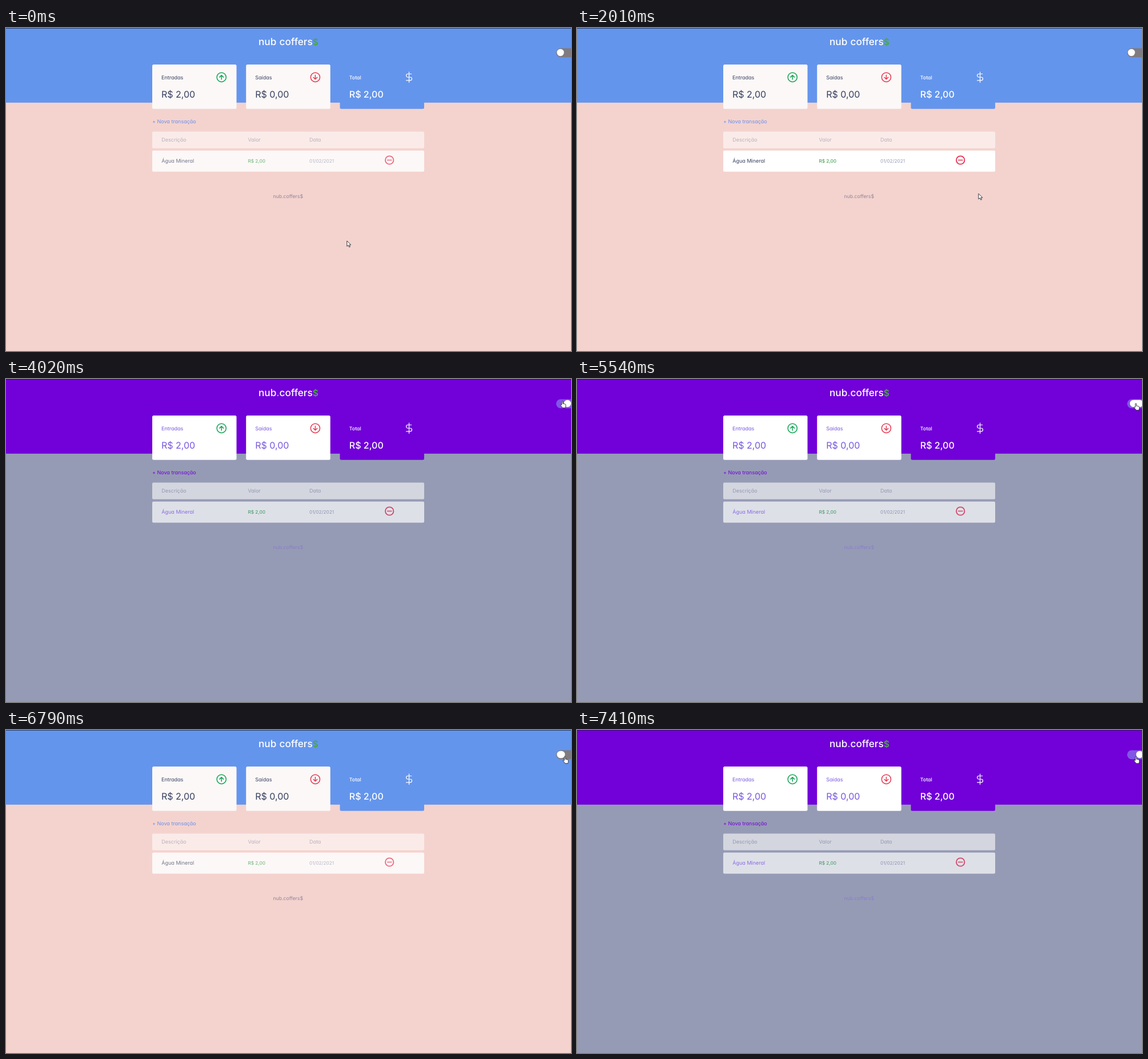
Recreate the animation shown at these times as an HTML page. Size 989 px wide and 566 px high, loop 8000 ms.

```html
<!DOCTYPE html>
<html lang="pt">
<head>
<meta charset="utf-8">
<style>
  html, body { margin: 0; width: 100%; height: 100%; overflow: hidden; }
  svg {
    display: block; width: 989px; height: 566px;
    font: 400 9px Inter, "Open Sans", sans-serif;
    font-feature-settings: "cv11";
    text-rendering: geometricPrecision;
    --page: #f4d3ce; --head: #6495ed; --card: #fcf8f7; --ink: #363f5f;
    --link: #6a8fee; --thead: #faebe9; --label: #b9b0ba; --date: #969cb3;
    --foot: #90849a; --track: #7f7b80; --dot: #6495ed; --edge: #2c3f66;
    --value: #49a457; --minus: #e92e4d; --row: #fcf8f7; --fade: .7;
  }
  svg.faded { --row: #fbf0ee; }
  svg.hover { --row: #fff; --fade: 1; }
  svg.dark {
    --page: #969bb5; --head: #7100d9; --card: #fff; --ink: #7857e0;
    --link: #7100d9; --thead: #d4d6df; --label: #9298b0; --date: #8085a6;
    --foot: #8a7ccb; --track: #8257e5; --dot: #c9b8e8; --edge: #3a0a6c;
    --value: #37965a; --minus: #d02d50; --row: #dee0e8; --fade: .85;
  }
  .page { fill: var(--page); }
  .head { fill: var(--head); }
  .card { fill: var(--card); }
  .ink { fill: var(--ink); }
  .label { fill: var(--label); }
  .total { fill: #fff; font-weight: 500; }
  .money { font-size: 16px; }
  .small { font-size: 8.2px; }
  .medium { font-weight: 500; }
  .icon { fill: none; stroke-width: 1.5; stroke-linecap: round; stroke-linejoin: round; }
  .cursor { fill: #fff; stroke: #24242c; stroke-width: .9; stroke-linejoin: round; }
</style>
</head>
<body>
<svg id="stage" viewBox="0 0 989 566">
  <rect class="page" width="989" height="566"/>
  <rect class="head" width="989" height="130.8"/>
  <rect width="989" height="1" fill="var(--edge)"/>

  <text class="medium" x="442" y="30" font-size="17.2" fill="#fff">nub<tspan fill="var(--dot)">.</tspan>coffers<tspan fill="#4aa647" font-weight="600" font-size="15.5">$</tspan></text>

  <rect class="card" x="256" y="64.1" width="147.5" height="77.6" rx="2.5"/>
  <rect class="card" x="420.2" y="64.1" width="147.5" height="77.6" rx="2.5"/>
  <rect class="head" x="584.5" y="64.1" width="147.5" height="77.6" rx="2.5"/>

  <g class="ink">
    <text x="272" y="89.6">Entradas</text>
    <text x="436.3" y="89.6">Saídas</text>
    <text class="money" x="272" y="122">R$ 2,00</text>
    <text class="money" x="436.3" y="122">R$ 0,00</text>
  </g>
  <g class="total">
    <text x="600.8" y="89.6" font-size="8.8">Total</text>
    <text class="money" x="600.8" y="122">R$ 2,00</text>
  </g>

  <g class="icon" stroke="#12a454">
    <circle cx="377.2" cy="86.3" r="8.1"/>
    <path d="M377.2 90V82.8M373.9 86.1L377.2 82.8L380.5 86.1"/>
  </g>
  <g class="icon" stroke="#e63950">
    <circle cx="541.4" cy="86.3" r="8.1"/>
    <path d="M541.4 82.6V89.8M538.1 86.5L541.4 89.8L544.7 86.5"/>
  </g>
  <path class="icon" stroke="#fff" transform="translate(695.7 76.4) scale(.82)"
    d="M12 1V23M17 5H9.5a3.5 3.5 0 0 0 0 7h5a3.5 3.5 0 0 1 0 7H6"/>

  <text x="256" y="167.4" fill="var(--link)">+ Nova transação</text>

  <rect x="256" y="181.5" width="476" height="29.2" rx="2" fill="var(--thead)"/>
  <g class="label">
    <text x="272.3" y="199.2">Descrição</text>
    <text x="423.5" y="199.2">Valor</text>
    <text x="531" y="199.2">Data</text>
  </g>

  <rect x="256" y="214.8" width="476" height="37" rx="2" fill="var(--row)"/>
  <g opacity="var(--fade)" style="opacity: var(--fade)">
    <text class="ink" x="272.3" y="236">Água Mineral</text>
    <text class="small medium" x="423.5" y="236" fill="var(--value)">R$ 2,00</text>
    <text class="small" x="531" y="236" fill="var(--date)">01/02/2021</text>
    <g class="icon" stroke="var(--minus)">
      <circle cx="671.2" cy="231.5" r="7.2" stroke-width="1.8"/>
      <path d="M667.5 231.5H675" stroke-width="1.3"/>
    </g>
  </g>

  <text x="493.7" y="298.3" text-anchor="middle" font-size="8.7" fill="var(--foot)">nub.coffers$</text>

  <rect x="963" y="35.4" width="33" height="15.8" rx="7.9" fill="var(--track)"/>
  <rect id="knob" y="36.8" height="12.4" rx="6.2" fill="#fff"/>

  <path id="arrow" class="cursor" d="M0 0V9.6L2.3 7.6L4 11L5.6 10.3L4 7H7Z"/>
  <path id="hand" class="cursor" d="M-1 6.6V1Q-1 0 0 0T1 1V4.5Q2.2 4.1 3 4.9Q4.1 4.6 4.8 5.4Q6 5.4 6 6.6V8.6Q6 10.2 5.2 12H.6Q-1 9.6 -3.4 7.2Q-3 5.6 -1 6.6Z"/>
</svg>
<script>
  const LOOP = 8000;
  const [stage, knob, arrow, hand] =
    ['stage', 'knob', 'arrow', 'hand'].map(id => document.getElementById(id));

  // Turning points of the pointer: time, x, y.
  const turns = [
    [0, 597, 373], [130, 572, 373], [450, 563, 373], [960, 528, 372], [1350, 512, 367],
    [1620, 487, 267], [2010, 703, 290.5], [2520, 620, 161], [2910, 848, 267],
    [3220, 963, 56], [3360, 971, 43], [3480, 973.8, 38.7], [4700, 973.8, 38.7], [4960, 978.3, 42.7]
  ];
  const clicks = [{ down: 4020, up: 4020 }, { down: 5350, up: 5680 }, { down: 6760, up: 6950 }];
  const hover = { from: 1770, to: 2520 };
  const overToggle = 3360;
  const nudge = 6240;

  const clamp = v => Math.min(1, Math.max(0, v));
  const easeOut = v => 1 - (1 - clamp(v)) ** 3;
  const mix = (a, b, k) => a + (b - a) * k;

  function pointerAt(t) {
    const i = turns.findIndex(p => p[0] > t);
    if (i < 0) {
      const [, x, y] = turns.at(-1);
      return [x, t < nudge ? y : y + 4];
    }
    const a = turns[i - 1], b = turns[i];
    const k = (t - a[0]) / (b[0] - a[0]);
    return [mix(a[1], b[1], k), mix(a[2], b[2], k)];
  }

  // The knob widens while pressed and slides across at each release.
  function knobAt(t) {
    let on = 0, stretch = 0;
    clicks.forEach(({ down, up }, i) => {
      const target = i % 2 ? 0 : 1;
      on = mix(on, target, easeOut((t - up + 120) / 260));
      const held = clamp((Math.min(t, up) - down) / 190);
      stretch += held * (1 - clamp((t - up) / 130));
    });
    const width = 12.4 + 11 * stretch;
    return { x: mix(964.3, 991.2 - width, on), width };
  }

  function draw(t) {
    const dark = clicks.filter(c => t >= c.up).length % 2 === 1;
    stage.classList.toggle('dark', dark);
    stage.classList.toggle('hover', t >= hover.from && t < hover.to);
    stage.classList.toggle('faded', t >= hover.to && t < clicks[0].up);

    const { x, width } = knobAt(t);
    knob.setAttribute('x', x);
    knob.setAttribute('width', width);

    const pointing = t >= overToggle;
    arrow.style.display = pointing ? 'none' : '';
    hand.style.display = pointing ? '' : 'none';
    const [px, py] = pointerAt(t);
    (pointing ? hand : arrow).setAttribute('transform', `translate(${px} ${py})`);
  }

  const start = performance.now();
  function tick() {
    draw((performance.now() - start) % LOOP);
    requestAnimationFrame(tick);
  }
  tick();
</script>
</body>
</html>
```
